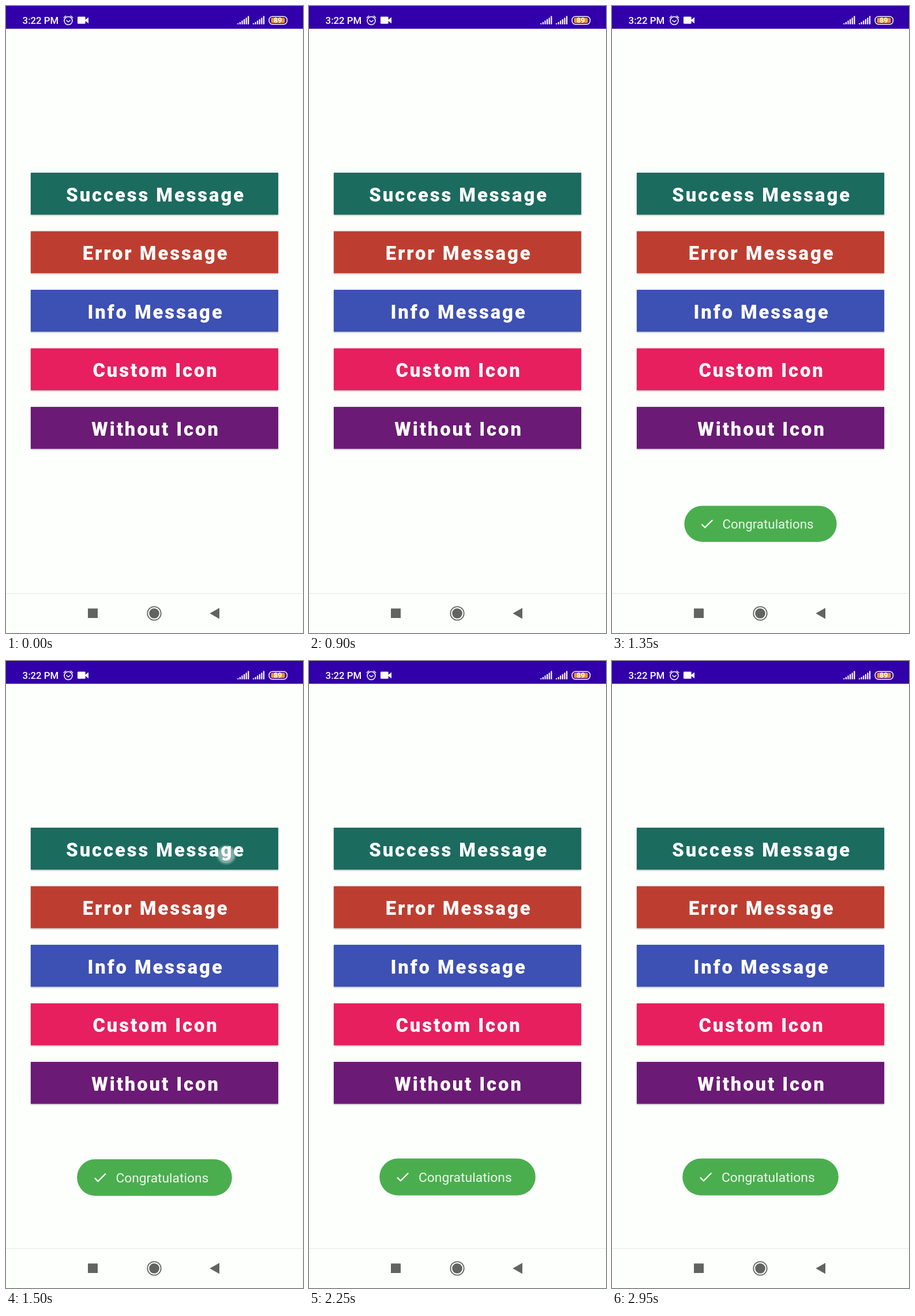
An HTML page for the animation above (3000 ms loop, 515 by 1087 pixels).

```html
<!DOCTYPE html>
<html lang="en">
<head>
<meta charset="utf-8">
<style>
  html, body { margin: 0; width: 100%; height: 100%; overflow: hidden; background: #fdfffd; }
  svg { display: block; width: 100%; height: 100%; font-family: Roboto, sans-serif; }
  .button rect { filter: drop-shadow(0 1.5px 1.5px rgba(0, 0, 0, .32)); }
  .button text { font-weight: 900; font-size: 32.76px; letter-spacing: .0893em; text-anchor: middle; fill: #fff; }
</style>
</head>
<body>
<svg id="stage" viewBox="0 0 515 1087">
  <defs>
    <radialGradient id="glow">
      <stop offset="0" stop-color="#fff" stop-opacity=".5"/>
      <stop offset=".72" stop-color="#fff" stop-opacity=".44"/>
      <stop offset=".82" stop-color="#fff" stop-opacity=".24"/>
      <stop offset="1" stop-color="#fff" stop-opacity="0"/>
    </radialGradient>
  </defs>

  <!-- status bar -->
  <rect width="515" height="39.5" fill="#3200aa"/>
  <g fill="#fff">
    <text x="28.6" y="30.8" font-size="16.8" font-weight="500">3:22 PM</text>
    <g fill="none" stroke="#fff" stroke-width="1.5" stroke-linecap="round">
      <circle cx="108" cy="25.6" r="7"/>
      <path d="M100.3 20.2l3.4-3M115.7 20.2l-3.4-3M104.9 25l3.1 2.6 3.3-2.6"/>
    </g>
    <rect x="124" y="18.6" width="13.6" height="12.2" rx="1.2"/>
    <path d="M137 24.2l6-4.6v10.6l-6-4.6z"/>
    <g id="signals"></g>
    <rect x="456.2" y="18.3" width="31.2" height="13.4" rx="5.6" fill="none" stroke="#fff" stroke-width="1.5"/>
    <rect x="459.5" y="20.6" width="24" height="8.8" rx="2" fill="#f0952b"/>
    <text x="471.2" y="29.3" font-size="12.5" font-weight="700" text-anchor="middle">89</text>
  </g>

  <g id="buttons"></g>

  <!-- navigation bar -->
  <rect y="1018" width="515" height="1" fill="#e6e8e6"/>
  <g fill="#626462">
    <rect x="142" y="1044.5" width="17" height="16.5" rx=".6"/>
    <circle cx="257" cy="1053" r="8.8"/>
    <circle cx="257" cy="1053" r="11.7" fill="none" stroke="#626462" stroke-width="1.8"/>
    <path d="M353.3 1053l16.7-9.6v19.2z"/>
  </g>

  <circle id="touch" cx="382" cy="336" r="18.5" fill="url(#glow)"/>

  <!-- centred on its own middle -->
  <g id="toast">
    <rect x="-135.3" y="-32" width="270.6" height="64" rx="32" fill="#4aae4e"/>
    <path transform="translate(-109.4 -14.3) scale(1.19)" fill="#f4faf4"
      d="M9 16.17L4.83 12l-1.42 1.41L9 19 21 7l-1.41-1.41z"/>
    <text x="-67.6" y="8.8" font-size="22.9" fill="#edf7ed">Congratulations</text>
  </g>
</svg>
<script>
const $ = id => document.getElementById(id);
const clamp = v => Math.max(0, Math.min(1, v));

const labels = [
  ['Success Message', '#1b6b5f'],
  ['Error Message', '#bd3e30'],
  ['Info Message', '#3d50b3'],
  ['Custom Icon', '#e71f5f'],
  ['Without Icon', '#6b1a75']
];
$('buttons').innerHTML = labels.map(([label, color], i) => `
  <g class="button" transform="translate(0 ${289 + i * 101.5})">
    <rect x="43" width="429" height="72.7" fill="${color}"/>
    <text x="259.6" y="49.6">${label}</text>
  </g>`).join('');

const bars = [2, 4, 6.5, 9, 11.5, 14.5];
$('signals').innerHTML = [401.2, 427.9].map(x => bars.map((h, i) =>
  `<rect x="${x + i * 3.6}" y="${31.8 - h}" width="2.2" height="${h}" rx=".6"/>`).join('')).join('');

const LOOP = 3000, STEP = 50, TOAST_AT = 1087;

function draw(t) {
  const age = t - TOAST_AT;
  const rest = Math.exp(-Math.max(0, age) / 123);
  $('toast').setAttribute('transform',
    `translate(257.5 ${894.5 + 27.5 * rest}) scale(${1 - .2 * rest})`);
  $('toast').setAttribute('opacity', clamp(age / 100));
  $('touch').setAttribute('opacity', t < 1400 ? 0 : clamp((1650 - t) / 150));
}

const start = performance.now();
function tick() {
  const t = (performance.now() - start) % LOOP;
  draw(Math.floor(t / STEP) * STEP);
  requestAnimationFrame(tick);
}
tick();
</script>
</body>
</html>
```
